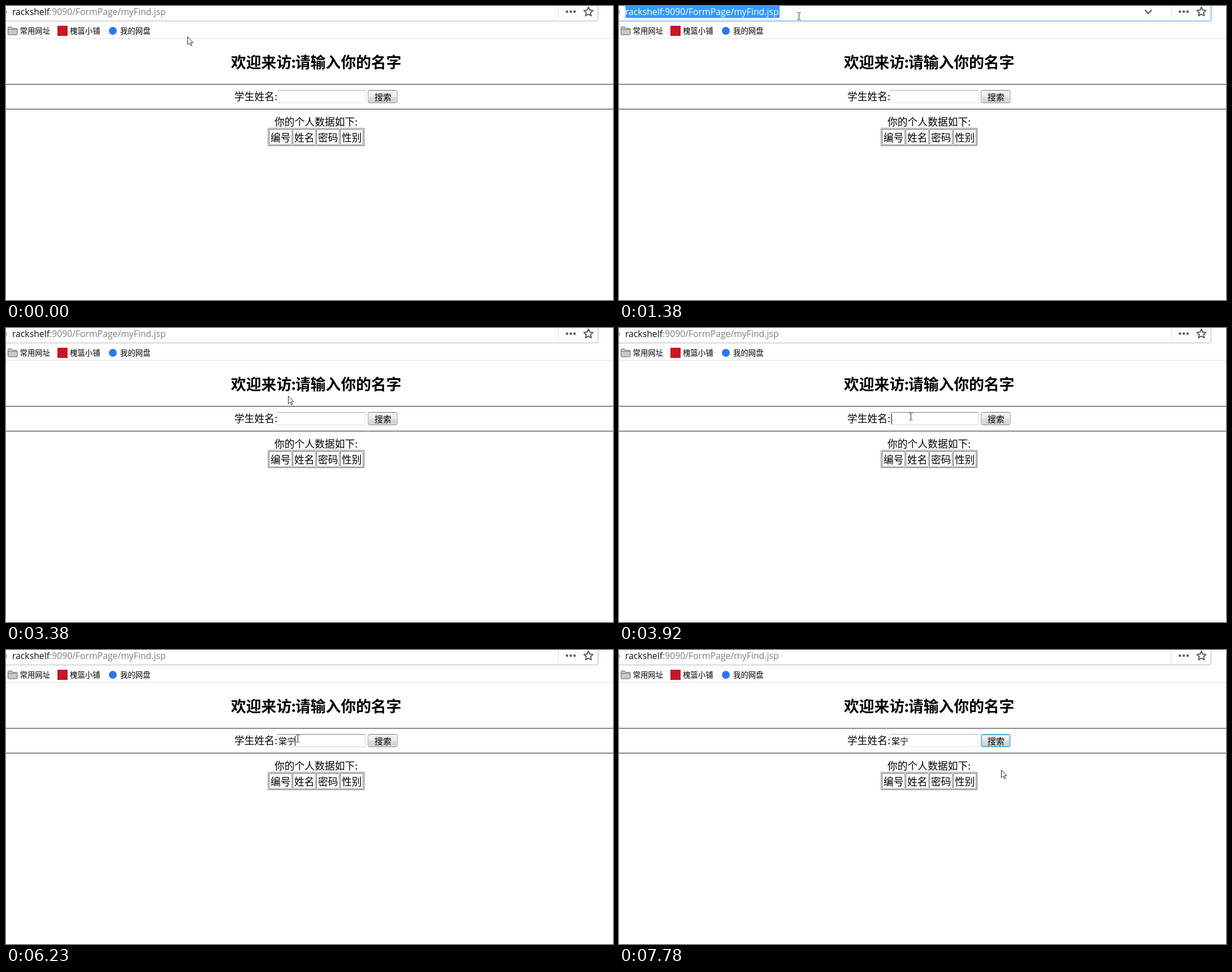
Recreate the animation shown at these times as an HTML page. Size 1074x521 px, loop 8000 ms.

```html
<!DOCTYPE html>
<html lang="zh-CN">
<head>
<meta charset="utf-8">
<title>Search form</title>
<style>
  html, body { margin: 0; width: 100%; height: 100%; overflow: hidden; background: #fefefe; }
  svg { display: block; width: 1074px; height: 521px; }
  text { font-family: "Noto Sans CJK SC", "Noto Sans CJK", sans-serif; font-size: 17.8px; fill: #000; }
  .title { font-size: 26.8px; font-weight: 700; }
  .mark { font-size: 13.4px; }
  .control { font-size: 15px; }
  .url { font-family: "Open Sans", "Noto Sans", sans-serif; font-size: 15.75px; }
  .line { fill: none; stroke-width: 1; }
  .icon { fill: none; stroke: #5b5b5f; stroke-width: 2; }
  .dark { stroke: #5a5a5a; }
  .light { stroke: #959595; }
</style>
</head>
<body>
<svg viewBox="0 0 1074 521">
  <defs>
    <linearGradient id="normal" x2="0" y2="1">
      <stop stop-color="#f3f3f3"/><stop offset=".5" stop-color="#ebebeb"/>
      <stop offset=".5" stop-color="#dddddd"/><stop offset="1" stop-color="#cfcfcf"/>
    </linearGradient>
    <linearGradient id="hover" x2="0" y2="1">
      <stop stop-color="#eaf6fd"/><stop offset=".5" stop-color="#d9f0fc"/>
      <stop offset=".5" stop-color="#bee6fd"/><stop offset="1" stop-color="#a7d9f5"/>
    </linearGradient>
    <linearGradient id="pressed" x2="0" y2="1">
      <stop stop-color="#e5f4fc"/><stop offset=".5" stop-color="#c4e5f6"/>
      <stop offset=".5" stop-color="#98d1ef"/><stop offset="1" stop-color="#68b3db"/>
    </linearGradient>
  </defs>

  <!-- Address bar -->
  <path id="halo" class="line" d="M0 28.5H1047Q1049.5 28.5 1049.5 26V0" style="stroke:#f4f4f4;stroke-width:4"/>
  <path id="barEdge" class="line" d="M0 26.5H1045Q1047.5 26.5 1047.5 24V0"/>
  <rect id="selection" x="11.5" y="0" width="272.5" height="21" fill="#3399ff"/>
  <circle cx="-5.5" cy="10.5" r="6" class="icon" style="stroke:#77777a;stroke-width:1.5"/>
  <text class="url" x="11" y="16"><tspan id="host">rackshelf</tspan><tspan id="path">:9090/FormPage/myFind.jsp</tspan></text>
  <path id="chevron" class="icon" d="M930.5 7l6 6 6-6" style="stroke-width:2.3"/>
  <path class="line" d="M977.5 0V21" stroke="#dcdcdf"/>
  <g fill="#5b5b5f"><circle cx="992.5" cy="10" r="2.2"/><circle cx="999.3" cy="10" r="2.2"/><circle cx="1006" cy="10" r="2.2"/></g>
  <path id="star" class="icon" stroke-linejoin="round"/>

  <!-- Bookmarks -->
  <path d="M3.5 49.5V38.5q0-1.5 1.5-1.5h5l2 2.5h6.5q1.5 0 1.5 1.5v8.5q0 1.5-1.5 1.5H5q-1.5 0-1.5-1.5z" fill="#c9c9c9" stroke="#626262"/>
  <path d="M4 41.5H20" stroke="#777"/>
  <rect x="91" y="35" width="18" height="18" fill="#c81623"/>
  <circle cx="189" cy="44" r="7" fill="#2b78ec"/>
  <text class="mark" x="24.5" y="49">常用网址</text>
  <text class="mark" x="113" y="49">槐篮小铺</text>
  <text class="mark" x="202" y="49">我的网盘</text>
  <path class="line" d="M0 57.5H1074" stroke="#e3e3e5"/>

  <!-- Page -->
  <text class="title" y="110"><tspan x="398">欢迎来访</tspan><tspan x="504.5">:</tspan><tspan x="512">请输入你的名字</tspan></text>
  <g class="line">
    <path class="dark" d="M0 138.5H1074M0 182.5H1074"/>
    <path class="light" d="M0 139.5H1074M0 183.5H1074" opacity=".6"/>
  </g>
  <text x="404" y="167">学生姓名:</text>
  <rect x="480" y="149" width="156" height="23" fill="#fff"/>
  <g class="line">
    <path id="fieldSides" d="M480 150V171.5H635.5V150"/>
    <path id="fieldTop" d="M480 149.5H636"/>
  </g>
  <text id="typed" class="control" x="482" y="167">棠宁</text>
  <path id="caret" stroke="#000" d="M0 152V170"/>
  <rect id="button" x="641" y="149.5" width="51" height="22" rx="2.5"/>
  <rect id="buttonInner" class="line" x="642" y="150.5" width="49" height="20" rx="1.5"/>
  <text class="control" x="652" y="167">搜索</text>
  <text x="475" y="212">你的个人数据如下:</text>
  <g id="table" class="line">
    <path class="light" d="M463.5 247.5V216.5H633.5"/>
    <path class="dark" d="M463.5 247.5H633.5V216.5"/>
  </g>

  <!-- Pointers -->
  <path id="arrow" d="M.5.5V14.5L3.7 11.5 6 16.5 8 15.6 5.8 10.7H10z" fill="#fff" stroke="#2b2b36"/>
  <path id="beam" class="line" d="M-2.5 -6.5H-.5L.5 -5.5 1.5 -6.5H3.5M.5 -5.5V5.5M-2.5 6.5H-.5L.5 5.5 1.5 6.5H3.5" stroke="#222"/>
</svg>

<script>
const LOOP = 8000;
const el = id => document.getElementById(id);
const arrow = (x, y) => ({ pointer: "arrow", x, y });
const beam = (x, y) => ({ pointer: "beam", x, y });

// Each step overrides part of the state from its time on.
const steps = [
  [0, { ...arrow(321, 54), barHover: 0, chevron: 0, focus: 0, selected: 0, fieldHover: 0, caret: 0, typed: 0, button: "normal" }],
  [160, arrow(319, 49)],
  [310, arrow(318, 43)],
  [430, { ...beam(318, 23), barHover: 1, chevron: .5 }],
  [550, { ...beam(318, 19), chevron: 1 }],
  [700, beam(318, 18)],
  [1120, { focus: 1 }],
  [1260, { selected: 1 }],
  [2400, { focus: 0, selected: 0 }],
  [3110, { ...arrow(430, 52), barHover: 0, chevron: .8 }],
  [3230, { ...arrow(477, 82), chevron: .4 }],
  [3380, { ...arrow(499, 120), chevron: 0 }],
  [3530, { ...beam(514, 154), fieldHover: 1 }],
  [3650, beam(516, 157)],
  [3920, { caret: 482.5 }],
  [4500, { caret: 0 }],
  [4960, { caret: 482.5 }],
  [5520, { caret: 0 }],
  [5950, { caret: 482.5 }],
  [6230, { typed: 1, caret: 511.5 }],
  [6510, { caret: 0 }],
  [6970, { ...arrow(640, 172), fieldHover: 0, caret: 511.5 }],
  [7090, arrow(681, 183)],
  [7240, arrow(683, 173)],
  [7360, { ...arrow(673, 162), button: "hover" }],
  [7520, { caret: 0, button: "pressed" }],
  [7660, { ...arrow(673, 176), button: "focused" }],
  [7780, arrow(676, 212)]
];

const buttonLooks = {
  normal: ["normal", "#707070", "#fafafa"],
  hover: ["hover", "#3c7fb1", "#f4fbfe"],
  pressed: ["pressed", "#2c628b", "#9cc4da"],
  focused: ["normal", "#2f87ad", "#5fd2f2"]
};

function set(id, attrs) {
  for (const [name, value] of Object.entries(attrs)) el(id).setAttribute(name, value);
}

function drawStatics() {
  const points = Array.from({ length: 10 }, (_, i) => {
    const angle = i * Math.PI / 5 - Math.PI / 2, r = i % 2 ? 4 : 8.5;
    return `${1030.5 + r * Math.cos(angle)} ${10.5 + r * Math.sin(angle)}`;
  });
  set("star", { d: `M${points.join("L")}z` });

  el("table").innerHTML += ["编号", "姓名", "密码", "性别"].map((label, i) => {
    const x = 465.5 + 42 * i;
    return `<path class="dark" d="M${x} 245.5V218.5h40"/>
      <path class="light" d="M${x} 245.5h40V218.5"/>
      <text x="${x + 2.5}" y="240">${label}</text>`;
  }).join("");
}

function render(t) {
  const s = Object.assign({}, ...steps.filter(([at]) => at <= t).map(([, patch]) => patch));
  const [fill, edge, inner] = buttonLooks[s.button];

  set("halo", { opacity: s.barHover });
  set("barEdge", { stroke: s.focus ? "#45a1ff" : "#b9b9bb" });
  set("selection", { opacity: s.selected });
  el("host").style.fill = s.selected ? "#fff" : "#0c0c0d";
  el("path").style.fill = s.selected ? "#fff" : s.focus ? "#0c0c0d" : "#808083";
  set("chevron", { opacity: s.chevron });

  set("fieldTop", { stroke: s.fieldHover ? "#6b8799" : "#abadb3" });
  set("fieldSides", { stroke: s.fieldHover ? "#c5dbea" : "#e0e3e8" });
  set("typed", { opacity: s.typed });
  set("caret", { opacity: s.caret ? 1 : 0, transform: `translate(${s.caret} 0)` });
  set("button", { fill: `url(#${fill})`, stroke: edge });
  set("buttonInner", { stroke: inner });

  for (const id of ["arrow", "beam"]) {
    set(id, { opacity: s.pointer === id ? 1 : 0, transform: `translate(${s.x} ${s.y})` });
  }
}

drawStatics();
const start = performance.now();
function tick() {
  render((performance.now() - start) % LOOP);
  requestAnimationFrame(tick);
}
tick();
</script>
</body>
</html>
```
